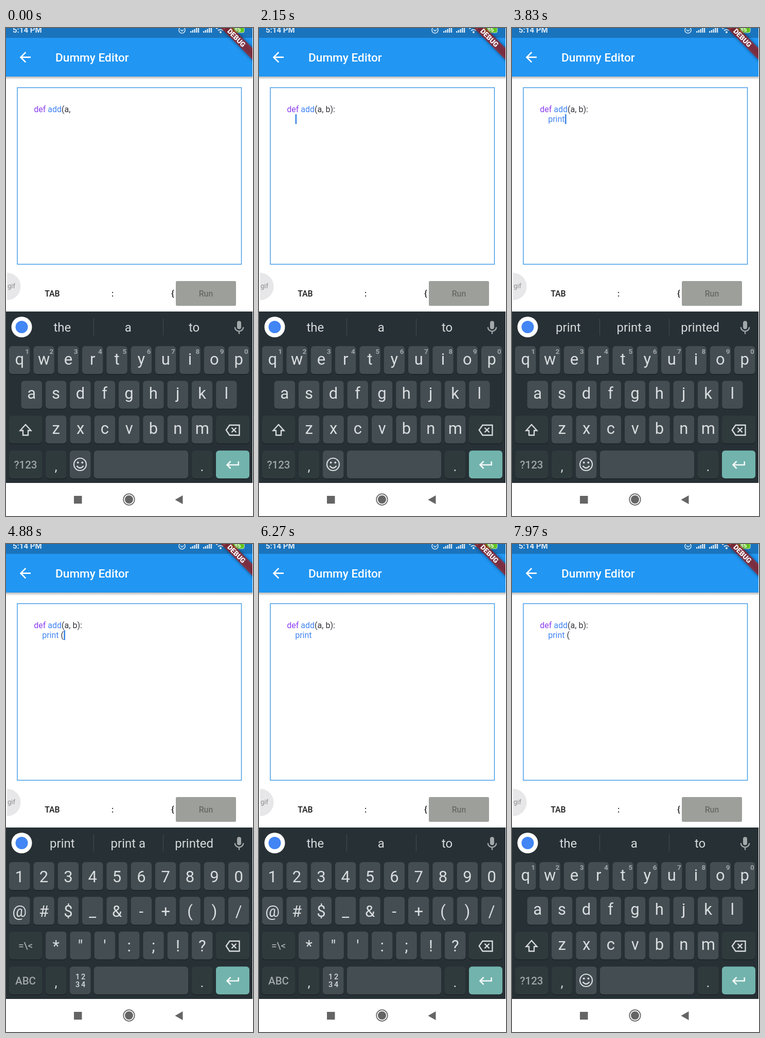
Write an HTML page that moves like this. It is 480 px wide and 945 px high and loops after 8 s.

```html
<!DOCTYPE html>
<html lang="en">
<head>
<meta charset="utf-8">
<title>Dummy Editor</title>
<style>
  html, body { margin: 0; width: 100%; height: 100%; overflow: hidden; background: #fff; }
  svg { display: block; font-family: Roboto, "Noto Sans", sans-serif; }
  text { white-space: pre; }
  .mid { text-anchor: middle; }
  .med { font-weight: 500; }
  .bold { font-weight: 700; }
  .line { fill: none; stroke-linecap: butt; stroke-linejoin: miter; }
</style>
</head>
<body>
<svg id="stage" width="480" height="945" viewBox="0 0 480 945">
  <defs>
    <linearGradient id="shade" x1="0" y1="0" x2="0" y2="1">
      <stop offset="0" stop-color="#000" stop-opacity=".28"/>
      <stop offset="1" stop-color="#000" stop-opacity="0"/>
    </linearGradient>
    <filter id="soft" x="-20%" y="-100%" width="140%" height="300%"><feGaussianBlur stdDeviation="3"/></filter>
    <clipPath id="edge"><rect x="2" y="470" width="40" height="60"/></clipPath>
  </defs>
  <rect width="480" height="945" fill="#fff"/>

  <!-- app bar -->
  <rect y="94" width="480" height="6" fill="url(#shade)"/>
  <rect width="480" height="94" fill="#2196f3"/>
  <rect width="480" height="19" fill="#1a74bd"/>
  <path transform="translate(21.330 40.700) scale(1.333)" fill="#fff"
    d="M20 11H7.830l5.590-5.590L12 4l-8 8 8 8 1.410-1.410L7.830 13H20z"/>
  <text class="med" x="96" y="64.500" font-size="22.670" fill="#fff">Dummy Editor</text>

  <!-- status icons -->
  <g id="status" fill="#dfeaf3">
    <text x="13" y="9" font-size="15" font-weight="700">5:14 PM</text>
    <circle class="line" cx="342" cy="4" r="6" stroke="#dfeaf3" stroke-width="1.500"/>
    <path class="line" d="M339 3l3 3l3.500-3" stroke="#dfeaf3" stroke-width="1.400"/>
    <path class="line" d="M408.500 1.500Q417-5 425.500 1.500M412 5Q417 1 422 5" stroke="#dfeaf3" stroke-width="2"/>
    <circle cx="417" cy="8" r="2"/>
    <rect x="439" y="-5" width="24" height="14" rx="3" fill="#62c41f" stroke="#cfe9c4"/>
    <text class="mid" x="450" y="7" font-size="11" font-weight="700" fill="#fff">85</text>
  </g>
  <g transform="translate(480 -13) rotate(45)">
    <rect x="-60" y="37.300" width="120" height="16" fill="#000" opacity=".5" filter="url(#soft)"/>
    <rect x="-60" y="37.300" width="120" height="16" fill="#b71c1c" opacity=".63"/>
    <text class="mid" y="50.200" font-size="13.600" font-weight="900" fill="#fff">DEBUG</text>
  </g>

  <!-- editor -->
  <rect x="22" y="115.500" width="435.500" height="342" fill="none" stroke="#3a97e6" stroke-width="1.400"/>
  <g font-size="16" fill="#33343a">
    <text id="first" x="54.300" y="163"><tspan fill="#8b3df0">def </tspan><tspan fill="#4285f4">add</tspan><tspan id="args"></tspan></text>
    <text id="second" x="70.200" y="182"></text>
  </g>
  <rect id="cursor" width="2.700" height="19" fill="#3f88e4"/>

  <!-- tool row -->
  <g class="med mid" font-size="15.870" fill="#1d1d1f">
    <text x="90" y="519.500">TAB</text>
    <text x="207" y="519.500">:</text>
    <text x="324" y="519.500">{</text>
    <rect x="330" y="490" width="117" height="48" rx="2.700" fill="#9da09a"/>
    <text x="388.500" y="519.500" fill="#676a65">Run</text>
  </g>
  <g clip-path="url(#edge)">
    <circle cx="2" cy="500.500" r="26.500" fill="#e7e6e8"/>
    <text x="3" y="504" font-size="13" fill="#8b8b8d">gif</text>
  </g>

  <!-- keyboard -->
  <rect y="549" width="480" height="332" fill="#273035"/>
  <circle cx="30.500" cy="579" r="20" fill="#fff"/>
  <circle cx="30.500" cy="579" r="12" fill="#4285f4"/>
  <path d="M170.500 563v32M305.500 563v32" stroke="#3d484d" stroke-width="1.300"/>
  <g transform="translate(437 564.500) scale(1.333)" fill="#a3a8aa">
    <rect x="9" y="2" width="6" height="12" rx="3"/>
    <path class="line" d="M5.850 11a6.150 5.950 0 0 0 12.300 0M12 17v4" stroke="#a3a8aa" stroke-width="1.800"/>
  </g>
  <g id="words" class="mid" font-size="24" fill="#d6dadc"></g>
  <g id="base"></g>
  <g id="letters"></g>
  <g id="symbols"></g>
  <g id="popup">
    <rect x="-27.500" y="-1" width="55" height="152" rx="6" fill="#000" opacity=".16"/>
    <rect x="-25.700" width="51.400" height="148.500" rx="5" fill="#3d474b"/>
    <text class="mid" y="50" font-size="36" fill="#fff"></text>
    <path d="M8 66h2.500M12.500 66h2.500M17 66h2.500" stroke="#e4e7e8" stroke-width="2.200"/>
  </g>

  <!-- navigation bar -->
  <rect x="132" y="906" width="15.500" height="15" fill="#656565"/>
  <circle cx="239" cy="913" r="10.800" fill="none" stroke="#656565" stroke-width="1.700"/>
  <circle cx="239" cy="913" r="8" fill="#656565"/>
  <path d="M328.500 913.500L343.500 905v17z" fill="#656565"/>

  <rect x="479" width="1" height="945" fill="#fff"/>
</svg>
<script>
const $ = id => document.getElementById(id);
const PITCH = 47.33, KEY_W = 40.5, KEY_H = 54;
const KEY = "#434d52", FN = "#2f3a3d", INK = "#d9dddf", DIM = "#a0a6a8", ENTER = "#72b3ad";
const ROWS = [616, 683.3, 750.5, 818.3];

function add(parent, tag, attrs, text) {
  const node = document.createElementNS("http://www.w3.org/2000/svg", tag);
  for (const name in attrs) node.setAttribute(name, attrs[name]);
  if (text) node.textContent = text;
  parent.append(node);
  return node;
}
const label = (parent, x, y, size, text, fill = INK, cls = "mid") =>
  add(parent, "text", { x, y, "font-size": size, fill, class: cls }, text);
const icon = (parent, d) =>
  add(parent, "path", { d, stroke: INK, "stroke-width": 2.3, class: "line" });

function key(parent, x, row, w = KEY_W, fill = KEY) {
  const shape = { x, width: w, height: KEY_H, rx: 6 };
  add(parent, "rect", { ...shape, y: ROWS[row] + 1.5, fill: "#1b2226" });
  return add(parent, "rect", { ...shape, y: ROWS[row], fill });
}

// Lays a row of characters out as keys and remembers where each one sits.
const spots = {};
function keyRow(parent, chars, x, row, baseline) {
  [...chars].forEach((char, i) => {
    const left = x + i * PITCH, mid = left + KEY_W / 2;
    key(parent, left, row);
    label(parent, mid, baseline, 31, char);
    spots[char] = [mid, ROWS[row] - 94.3];
  });
}

const base = $("base"), letters = $("letters"), symbols = $("symbols");

const pressable = {
  mode: [key(base, 6, 3, 64, FN), FN, "#4a565a"],
  back: [key(base, 408, 2, 65, FN), FN, "#4a565a"],
  enter: [key(base, 408, 3, 65, ENTER), ENTER, "#95cbc6"]
};
key(base, 6, 2, 64, FN);
key(base, 77, 3, KEY_W, FN);
key(base, 124, 3);
key(base, 171, 3, 183);
key(base, 361, 3, KEY_W, FN);
label(base, 97, 857.5, 26, ",");
label(base, 381, 857.5, 26, ".");
icon(base, "M427.800 778.500L434.500 769H453.500V788.500H434.500ZM438.500 774l9 9M447.500 774l-9 9");
add(base, "path", {
  d: "M19 7v4H5.830l3.580-3.590L8 6l-6 6 6 6 1.410-1.410L5.830 13H21V7z",
  transform: "translate(425 830) scale(1.333)", fill: "#f2f8f7"
});

keyRow(letters, "qwertyuiop", 6, 0, 651.5);
keyRow(letters, "asdfghjkl", 29.5, 1, 718);
keyRow(letters, "zxcvbnm", 77, 2, 786);
[..."1234567890"].forEach((digit, i) =>
  label(letters, 41 + i * PITCH, 631, 13.5, digit, DIM, "mid bold"));
icon(letters, "M38 768L27.500 779.500H33V788.500H43V779.500H48.500Z");
label(letters, 38, 853, 20.5, "?123", DIM, "mid med");
add(letters, "circle", { cx: 144, cy: 845, r: 12, fill: "none", stroke: INK, "stroke-width": 2.2 });
icon(letters, "M137.500 848q6.500 8 13 0");
for (const cx of [139.7, 148.3]) add(letters, "circle", { cx, cy: 841.5, r: 1.9, fill: INK });

keyRow(symbols, "1234567890", 6, 0, 655);
keyRow(symbols, "@#$_&-+()/", 6, 1, 722);
keyRow(symbols, "*\"':;!?", 77, 2, 789);
label(symbols, 38, 784, 19, "=\\<", DIM, "mid med");
label(symbols, 38, 853, 20.5, "ABC", DIM, "mid med");
[..."1234"].forEach((digit, i) =>
  label(symbols, 139 + i % 2 * 11, 843 + (i >> 1) * 15, 14.5, digit, INK, "mid med"));

for (const left of [358, 383])
  for (let i = 0; i < 5; i++)
    add($("status"), "rect", { x: left + i * 3.7, y: 6 - i * 2, width: 2.4, height: 3 + i * 2 });

const words = [109.3, 237.4, 365.6].map(x => label($("words"), x, 588, 24, "", "#d6dadc"));

// Each step changes part of the state from its time on; a null body keeps the cursor on line one.
const COMMON = "the|a|to", PRINT = "print|print a|printed";
const STEPS = [
  [0, { args: "(a,", body: null, cursor: 0, sym: 0, words: COMMON, pop: "", press: "" }],
  [90, { args: "(a, b", cursor: 1 }],
  [390, { sym: 1, words: "b|g|be" }],
  [750, { cursor: 0 }],
  [990, { pop: ")" }],
  [1170, { args: "(a, b)", cursor: 1 }],
  [1230, { pop: "", words: COMMON }],
  [1480, { pop: ":" }],
  [1570, { args: "(a, b):", pop: "" }],
  [2020, { press: "enter" }],
  [2080, { body: "" }],
  [2150, { press: "", sym: 0 }],
  [2700, { cursor: 0 }],
  [2790, { pop: "p" }],
  [2880, { body: "p", cursor: 1 }],
  [2980, { pop: "", words: "price|play|people" }],
  [3160, { pop: "r", words: "price|pr|people" }],
  [3360, { body: "pr", pop: "" }],
  [3450, { pop: "i" }],
  [3550, { body: "pri", pop: "", words: "print|price|private" }],
  [3750, { body: "print" }],
  [3830, { words: PRINT }],
  [4030, { sym: 1 }],
  [4320, { cursor: 0 }],
  [4600, { pop: "(" }],
  [4700, { pop: "" }],
  [4880, { body: "print (", cursor: 1 }],
  [4910, { words: COMMON }],
  [5270, { press: "back" }],
  [5350, { body: "print " }],
  [5430, { press: "" }],
  [5590, { sym: 0 }],
  [5700, { words: PRINT }],
  [5910, { words: COMMON }],
  [6170, { sym: 1 }],
  [6270, { cursor: 0 }],
  [6780, { pop: "(" }],
  [6880, { body: "print (", cursor: 1 }],
  [6980, { pop: "" }],
  [7450, { cursor: 0 }],
  [7740, { sym: 0 }],
  [7940, { press: "mode" }],
  [7970, { press: "" }]
];
const LOOP = 8000;

const show = (node, on) => node.setAttribute("visibility", on ? "visible" : "hidden");

function drawCode({ args, body, cursor }) {
  $("args").textContent = args;
  const second = $("second");
  second.textContent = "";
  const [word, rest] = (body || "").startsWith("print") ? ["print", body.slice(5)] : ["", body || ""];
  add(second, "tspan", { fill: "#4285f4" }, word);
  add(second, "tspan", {}, rest);
  const line = body === null ? $("first") : second;
  const start = +line.getAttribute("x");
  $("cursor").setAttribute("x", start + line.getComputedTextLength() + 0.3);
  $("cursor").setAttribute("y", body === null ? 148.3 : 167);
  show($("cursor"), cursor);
}

function draw(state) {
  drawCode(state);
  show(letters, !state.sym);
  show(symbols, state.sym);
  state.words.split("|").forEach((word, i) => { words[i].textContent = word; });
  for (const name in pressable) {
    const [shape, idle, active] = pressable[name];
    shape.setAttribute("fill", state.press === name ? active : idle);
  }
  const popup = $("popup");
  show(popup, state.pop);
  if (state.pop) {
    popup.setAttribute("transform", `translate(${spots[state.pop]})`);
    popup.querySelector("text").textContent = state.pop;
  }
}

let shown = -1;
function tick() {
  const time = performance.now() % LOOP;
  const past = STEPS.filter(([at]) => at <= time);
  if (past.length !== shown) {
    shown = past.length;
    draw(Object.assign({}, ...past.map(([, change]) => change)));
  }
  requestAnimationFrame(tick);
}
tick();
</script>
</body>
</html>
```
